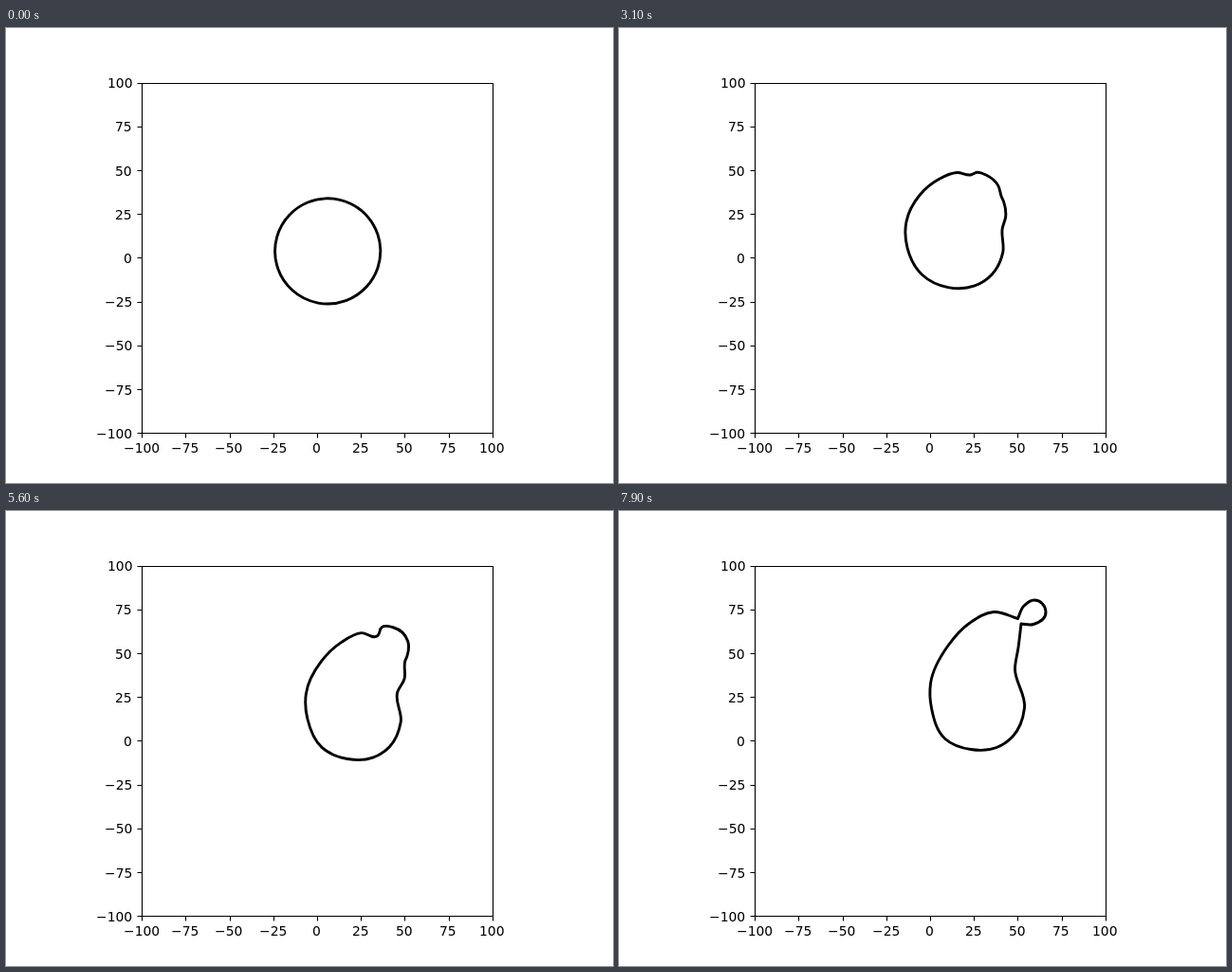
Recreate the animation shown at these times as an HTML page. Size 640 by 480 pixels, loop 8000 ms.

```html
<!DOCTYPE html>
<html lang="en">
<head>
<meta charset="utf-8">
<title>Deforming contour</title>
<style>
  html, body { margin: 0; width: 100%; height: 100%; overflow: hidden; background: #fff; }
  svg { display: block; width: 640px; height: 480px; }
  text { font: 13.89px "DejaVu Sans", sans-serif; }
  .axis { fill: none; stroke: #000; stroke-width: 1.11; }
  #contour { fill: none; stroke: #000; stroke-width: 2.9; stroke-linejoin: round; }
</style>
</head>
<body>
<svg viewBox="0 0 640 480">
  <path class="axis" id="axes"/>
  <g id="labels"></g>
  <path id="contour"/>
</svg>
<script>
const LOOP = 8000, STEP = 100, LAST = LOOP - STEP;
const CENTRE = [339.2, 235.4], RADIUS = 55.6;
const HEADING = -0.826;

// Where the outline ends up, clockwise from the tip of the bud.
const finish = [
  [450, 106], [437, 119.5], [424, 119], [421, 144], [417.5, 166], [427.5, 208],
  [415, 238], [398, 249.5], [371, 251.5], [344, 240.5], [329.5, 208], [328.5, 182],
  [347, 142], [370, 118], [395, 106.5], [420.5, 113.5], [427, 100], [438, 94]
];
const NECK = [2, 15];

const bell = x => Math.exp(-x * x);
const ahead = [Math.cos(HEADING), Math.sin(HEADING)];
const aside = [-ahead[1], ahead[0]];

// Each point leaves the starting circle, packed closer towards the heading.
// The front lags while the back leads, and the neck stays wide until late.
const movers = finish.map((end, i) => {
  const turn = 2 * Math.PI * i / finish.length;
  const angle = turn - 0.62 * Math.sin(turn);
  const deg = (angle > Math.PI ? angle - 2 * Math.PI : angle) * 180 / Math.PI;
  const x = deg / 28;
  return {
    start: [CENTRE[0] + RADIUS * Math.cos(HEADING + angle),
            CENTRE[1] + RADIUS * Math.sin(HEADING + angle)],
    end,
    lead: -1 - 3.5 * Math.cos(angle) - 5 * bell((deg + 6) / 20),
    spread: x * bell(x) * (30 + 8 * x)
  };
});

function pointsAt(u) {
  const early = 4 * u * (1 - u), late = 1.87 * u * (1 - u ** 4);
  return movers.map(m => [0, 1].map(k =>
    m.start[k] + (m.end[k] - m.start[k]) * u
    + ahead[k] * m.lead * early + aside[k] * m.spread * late));
}

const unit = (x, y) => { const l = Math.hypot(x, y) || 1; return [x / l, y / l]; };

// Closed curve with arc-like handles; the neck turns into corners late on.
function outline(pts, sharp) {
  const n = pts.length;
  const chords = pts.map((p, i) => {
    const q = pts[(i + 1) % n], dx = q[0] - p[0], dy = q[1] - p[1];
    return { dir: unit(dx, dy), len: Math.hypot(dx, dy) };
  });
  const tangents = pts.map((_, i) => {
    const a = chords[(i + n - 1) % n], b = chords[i];
    return unit(a.dir[0] * b.len + b.dir[0] * a.len, a.dir[1] * b.len + b.dir[1] * a.len);
  });
  const handle = (i, chord, sign) => {
    const s = NECK.includes(i) ? sharp : 0, d = chord.dir, g = tangents[i];
    const v = unit(g[0] * (1 - s) + d[0] * s, g[1] * (1 - s) + d[1] * s);
    const dot = Math.max(0, v[0] * d[0] + v[1] * d[1]);
    const l = sign * chord.len * 2 / (3 * (1 + dot));
    return [pts[i][0] + v[0] * l, pts[i][1] + v[1] * l];
  };
  const fmt = p => p[0].toFixed(2) + " " + p[1].toFixed(2);
  let d = "M" + fmt(pts[0]);
  chords.forEach((c, i) => {
    const j = (i + 1) % n;
    d += "C" + [handle(i, c, 1), handle(j, c, -1), pts[j]].map(fmt).join(" ");
  });
  return d + "Z";
}

const labels = document.getElementById("labels");

function addLabel(str, x, y, align) {
  const el = document.createElementNS("http://www.w3.org/2000/svg", "text");
  el.textContent = str;
  labels.append(el);
  el.setAttribute("x", Math.floor(x - align * el.getComputedTextLength()));
  el.setAttribute("y", Math.round(y));
}

function drawAxes() {
  const snap = v => Math.round(v) + 0.5;
  let line = "M143.5 58.5H513.5V427.5H143.5Z";
  for (let k = 0; k <= 8; k++) {
    const x = 143.2 + 46.2 * k, y = 427.2 - 46.2 * k;
    const str = String(k * 25 - 100).replace("-", "\u2212");
    line += `M${snap(x)} 427.5v5M143.5 ${snap(y)}h-5`;
    addLabel(str, x, 448, 0.5);
    addLabel(str, 133.5, y + 5.6, 1);
  }
  document.getElementById("axes").setAttribute("d", line);
}

const contour = document.getElementById("contour");
const start = performance.now();

function frame() {
  const elapsed = (performance.now() - start) % LOOP;
  const u = Math.floor(elapsed / STEP) * STEP / LAST;
  const sharp = Math.max(0, (u - 0.82) / 0.18);
  contour.setAttribute("d", outline(pointsAt(u), sharp));
  requestAnimationFrame(frame);
}

drawAxes();
frame();
</script>
</body>
</html>
```
